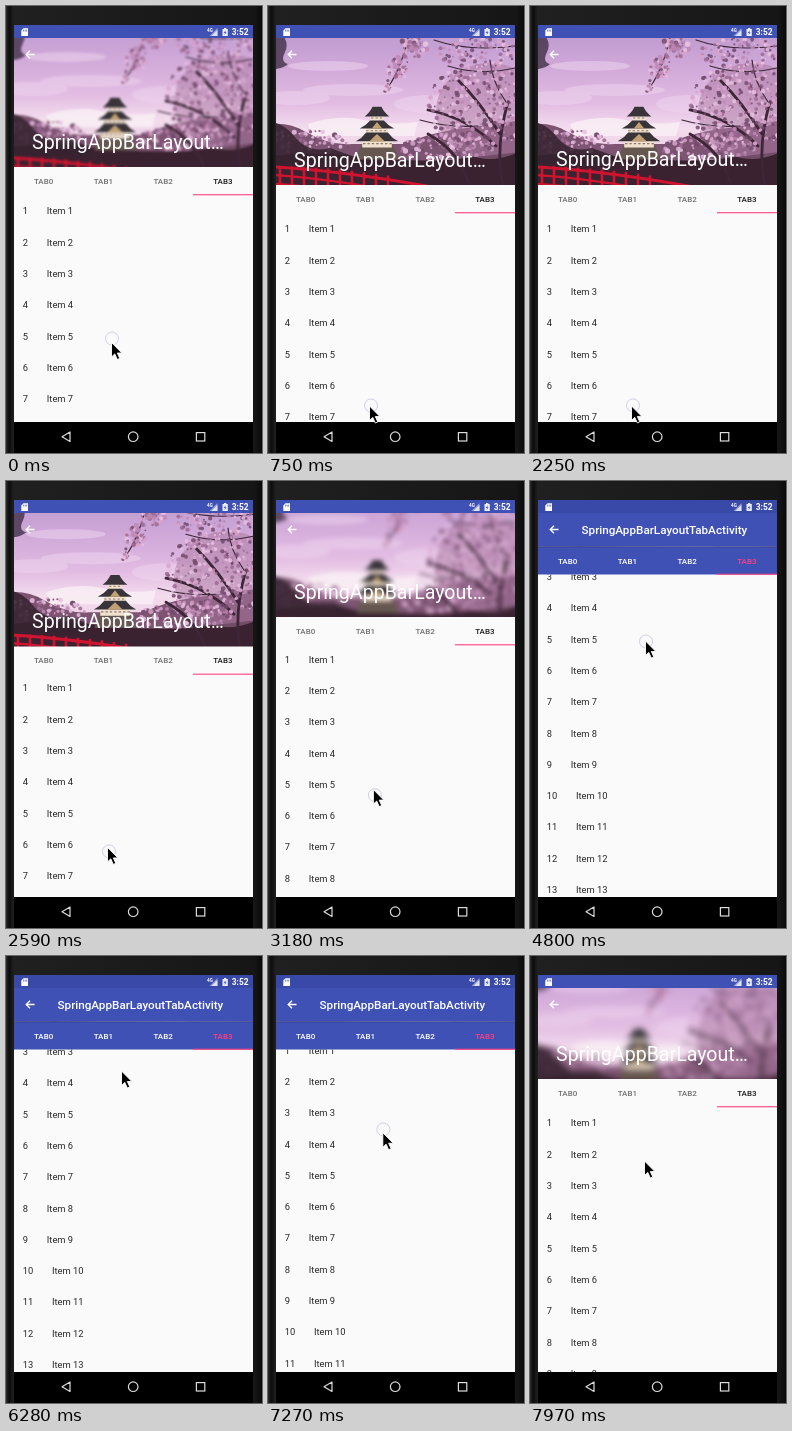
Animation of 256x447 px, one loop 8000 ms. Source, as an HTML page:

```html
<!DOCTYPE html>
<html lang="en">
<head>
<meta charset="utf-8">
<title>Spring app bar</title>
<style>
  html, body { margin: 0; width: 100%; height: 100%; overflow: hidden; background: #161616; }
  svg { display: block; width: 100vw; height: 100vh; }
  text { font-family: Roboto, sans-serif; }
</style>
</head>
<body>
<svg id="stage" viewBox="0 0 256 447">
  <defs>
    <linearGradient id="sky" x1="0" y1="0" x2="0" y2="1">
      <stop offset="0" stop-color="#b794cb"/>
      <stop offset=".25" stop-color="#cfa8d8"/>
      <stop offset=".45" stop-color="#e2bce2"/>
      <stop offset=".58" stop-color="#f3dcee"/>
      <stop offset="1" stop-color="#e0b8d2"/>
    </linearGradient>
    <linearGradient id="bezel">
      <stop offset="0" stop-color="#2c2c2c"/>
      <stop offset=".012" stop-color="#0c0c0c"/>
      <stop offset=".03" stop-color="#202020"/>
      <stop offset=".97" stop-color="#161616"/>
      <stop offset="1" stop-color="#0a0a0a"/>
    </linearGradient>
    <filter id="soft" filterUnits="userSpaceOnUse" x="-12" y="12" width="280" height="190"
            color-interpolation-filters="sRGB">
      <feGaussianBlur id="blur" stdDeviation="0"/>
    </filter>
    <clipPath id="photoClip"><rect id="photoBox" x="8" width="239"/></clipPath>
    <clipPath id="screenClip"><rect x="8" y="19" width="239" height="397"/></clipPath>
  </defs>

  <rect width="256" height="447" fill="url(#bezel)"/>
  <g clip-path="url(#screenClip)">
    <rect x="8" y="19" width="239" height="397" fill="#fafafa"/>
    <g id="list" font-size="9.35" fill="#262626"></g>

    <g id="tabs">
      <rect x="8" width="239" height="28" fill="#fafafa"/>
      <rect class="scrim" x="8" width="239" height="28" fill="#3f51b5"/>
      <path class="scrim" d="M8 .5H247" stroke="#000" stroke-opacity=".18" stroke-width=".8"/>
      <g id="labels" font-size="8" font-weight="500" text-anchor="middle"></g>
      <rect x="187" y="27.2" width="60" height="1.1" fill="#ff4081"/>
    </g>

    <rect x="8" y="19" width="239" height="13" fill="#3f51b5"/>
    <g clip-path="url(#photoClip)"><g id="shift"><g id="photo">
      <rect x="-12" y="12" width="280" height="190" fill="url(#sky)"/>
      <g fill="#f0d6f0" opacity=".5">
        <ellipse cx="60" cy="60" rx="40" ry="5"/>
        <ellipse cx="85" cy="84" rx="50" ry="6"/>
        <ellipse cx="28" cy="92" rx="34" ry="7"/>
        <ellipse cx="160" cy="98" rx="34" ry="9"/>
      </g>
      <path d="M40 118Q70 108 96 114T150 116L146 130H44Z" fill="#fbf0f6" opacity=".8"/>
      <path d="M-12 122Q14 112 38 126T84 138L138 138Q158 128 184 124L268 112V202H-12Z" fill="#7d5472"/>
      <g id="backBloom"></g>
      <path d="M-12 152Q40 144 85 150T180 154L268 144V202H-12Z" fill="#3a2230"/>
      <g transform="translate(23 32) scale(.8)">
        <path d="M82 152L87 135H128L135 152Z" fill="#665850"/>
        <path d="M89 127H126V137H89ZM94 111H121V120H94ZM99 96H116V104H99Z" fill="#f1e2d0"/>
        <path d="M94 116H121M90 132H126M100 100H115" stroke="#8d7768" stroke-width="1.4"
              stroke-dasharray="3 2.5"/>
        <path d="M92 98Q98 94 102 86H113Q117 94 123 98ZM86 113Q94 109 99 103H116Q121 109 129 113ZM81 129Q89 125 94 118H121Q126 125 134 129Z" fill="#38343a"/>
        <path d="M101 113L107.500 105L114 113ZM98 129L107.500 120L117 129Z" fill="#c3a071"/>
      </g>
      <path d="M-12 116Q12 112 26 130T62 142L84 150V158H-12Z" fill="#35242f" opacity=".85"/>
      <path d="M-12 26H12Q22 36 17 46T20 58Q12 66 -12 62Z" fill="#493750" opacity=".85"/>
      <ellipse cx="222" cy="105" rx="54" ry="48" fill="#a9799f" opacity=".5"/>
      <g fill="none" stroke="#3d2638" stroke-linecap="round">
        <path d="M236 184Q226 144 240 96M228 140Q200 112 160 104M232 128Q212 96 190 74M200 176Q192 146 160 128" stroke-width="2.800"/>
        <path d="M247 62Q212 70 180 60M247 40Q200 46 166 34M140 32Q134 60 120 82M238 96Q224 76 222 54M210 120Q180 122 152 114" stroke-width="1.200"/>
      </g>
      <g id="frontBloom"></g>
      <g fill="none" stroke="#d0142f">
        <path d="M-12 160Q70 163 180 184" stroke-width="3"/>
        <path d="M-12 168Q60 171 150 190M-12 177Q50 179 120 194" stroke-width="2.400"/>
        <path id="posts" stroke-width="2.600"/>
      </g>
    </g></g></g>
    <rect id="barScrim" class="scrim" x="8" y="32" width="239" fill="#3f51b5"/>
    <rect class="scrim" x="8" y="19" width="239" height="13" fill="#3949a8"/>

    <path d="M28.500 48.500H20.500M24 44.700L20.200 48.500L24 52.300" fill="none" stroke="#fff" stroke-width="1.300"/>
    <text id="title" fill="#fff"></text>

    <g fill="#fff">
      <path d="M17.500 22.300H22V30H15.300V24.500Z"/>
      <path d="M17.600 23.600V25.600M19.200 23.600V25.600M20.700 23.600V25.600" stroke="#3f51b5" stroke-width=".7"/>
      <text x="201" y="25.500" font-size="4.600" font-weight="700">4G</text>
      <path d="M211.500 22V30H203.500Z" opacity=".45"/>
      <path d="M211.500 24V30H205.500Z" opacity=".7"/>
      <path d="M218 22H220.300V23H221.800V30H216.500V23H218Z" opacity=".9"/>
      <path d="M219.600 24.200L217.700 27H219L218.600 29L220.500 26.200H219.300Z" fill="#3f51b5"/>
      <text x="225.800" y="29" font-size="8.400" font-weight="600">3:52</text>
    </g>
  </g>

  <rect x="8" y="416" width="239" height="31" fill="#000"/>
  <g fill="none" stroke="#dcdcdc" stroke-width="1.200">
    <path d="M64 426V435.500L56 430.700Z" stroke-linejoin="round"/>
    <circle cx="127.200" cy="430.700" r="4.800"/>
    <rect x="190.400" y="426.600" width="8.400" height="8.400"/>
  </g>

  <circle id="ring" r="6.500" fill="none" stroke="#c3c5e2" stroke-width=".8"/>
  <path id="cursor" d="M0 0V14.500L3.300 11.400L5.800 17L8.300 15.900L5.800 10.500H10.400Z"
        fill="#000" stroke="#fff" stroke-width=".9"/>
</svg>
<script>
const LOOP = 8000, REST = 122, MIN = 65.5, OPEN = 179, ROW = 31.3;
const $ = id => document.getElementById(id);
const set = (el, attrs) => { for (const k in attrs) el.setAttribute(k, attrs[k]); return el; };
const add = (parent, tag, attrs, text = '') => {
  const el = set(document.createElementNS('http://www.w3.org/2000/svg', tag), attrs);
  el.textContent = text;
  return parent.appendChild(el);
};
const move = (el, x, y) => el.setAttribute('transform', `translate(${x} ${y})`);
const clamp = v => Math.min(1, Math.max(0, v));
const mix = (a, b, p) => a + (b - a) * p;
const blend = (a, b, p) => `rgb(${a.map((v, i) => Math.round(mix(v, b[i], p)))})`;
const easeOut = p => 1 - (1 - p) * (1 - p);

// Piecewise linear track of [time, ...values]
function track(keys, t) {
  let i = 1;
  while (i < keys.length - 1 && keys[i][0] < t) i++;
  const a = keys[i - 1], b = keys[i], p = clamp((t - a[0]) / (b[0] - a[0]));
  return a.slice(1).map((v, k) => mix(v, b[k + 1], p));
}

const HEIGHT = [[60, 161], [750, 179], [2250, 179], [2590, 165.5], [3463, REST], [3800, 90],
  [4052, MIN], [7415, MIN], [7970, 123]];
const SCROLL = [[2250, 0], [2590, 2.5], [3800, 1], [4052, 1], [4800, 76.5], [6690, 76.5], [7415, 0]];
const CURSOR = [[60, 105.5, 336.5], [750, 101.5, 400], [2250, 101.5, 400], [2590, 101.5, 366.5],
  [3800, 109.5, 248], [4800, 115.5, 160], [4930, 115.5, 160], [4980, 115.5, 162],
  [5100, 115.5, 162], [5630, 119, 80], [5800, 119, 80], [5860, 119, 77], [6050, 119, 77],
  [6280, 115.5, 115], [6640, 115.5, 115], [7560, 114.5, 205]];
const RING = [[60, 106, 332.5], [750, 103, 399.5], [2250, 103, 399.5], [2590, 103, 370.5],
  [3800, 111, 255], [4800, 116, 160.5], [6520, 116, 116], [6690, 116, 116], [7560, 115, 202]];

let seed = 7;
const rnd = () => (seed = seed * 16807 % 2147483647) / 2147483647;
const PINKS = ['#d9a3cc', '#c088b6', '#9c6a93', '#e8bfe0', '#734a6c'];

function bloom(parent, cx, cy, rx, ry, count, size) {
  for (let i = 0; i < count; i++) {
    const a = rnd() * 2 * Math.PI, d = Math.sqrt(rnd());
    add(parent, 'circle', {
      cx: (cx + Math.cos(a) * d * rx).toFixed(1),
      cy: (cy + Math.sin(a) * d * ry).toFixed(1),
      r: (size * (.5 + rnd())).toFixed(1),
      fill: PINKS[Math.floor(rnd() * PINKS.length)],
      opacity: .85
    });
  }
}

bloom($('backBloom'), 36, 137, 44, 13, 80, 1.7);
bloom($('backBloom'), 180, 142, 48, 14, 110, 1.8);
bloom($('frontBloom'), 212, 100, 52, 44, 330, 1.6);
bloom($('frontBloom'), 212, 46, 42, 16, 110, 1.6);
bloom($('frontBloom'), 145, 42, 14, 11, 50, 1.8);
bloom($('frontBloom'), 130, 62, 11, 11, 40, 1.7);
bloom($('frontBloom'), 119, 80, 5, 6, 14, 1.5);

let posts = '';
for (let x = 0; x < 130; x += 12) posts += `M${x} ${160 + x * x / 1500}v28`;
$('posts').setAttribute('d', posts);

for (let n = 1; n <= 15; n++) {
  const y = 47.4 + ROW * (n - 1);
  add($('list'), 'text', { x: 16.8, y }, n);
  add($('list'), 'text', { x: n < 10 ? 40.8 : 46, y }, 'Item ' + n);
}
const labels = [0, 1, 2, 3].map(i => add($('labels'), 'text', { x: 37.6 + i * 59.75, y: 17 }, 'TAB' + i));
const scrims = document.querySelectorAll('.scrim');

function drawTitle(h) {
  const p = clamp((REST - h) / (REST - MIN)), closed = p > .985;
  const title = $('title');
  title.textContent = closed ? 'SpringAppBarLayoutTabActivity' : 'SpringAppBarLayout…';
  set(title, {
    x: mix(26, 51.5, p),
    y: mix(Math.max(h, REST) - 18.5, 52.8, p),
    'font-size': mix(19.6, 11.7, easeOut(p)),
    'font-weight': closed ? 500 : 400
  });
}

function drawPhoto(h) {
  const under = Math.max(0, REST - h);
  const top = Math.max(19, 32 - under);
  const centre = (32 + Math.max(h, REST)) / 2 - under;
  const blur = 3 * clamp((OPEN - h) / (OPEN - REST));
  set($('photoBox'), { y: top, height: Math.max(0, h - top) });
  move($('shift'), 0, centre - 105.5);
  $('blur').setAttribute('stdDeviation', blur.toFixed(2));
  $('photo').setAttribute('filter', blur > .05 ? 'url(#soft)' : 'none');
}

function draw(t) {
  const [h] = track(HEIGHT, t), [scroll] = track(SCROLL, t);
  const fade = t < 6000 ? easeOut(clamp((t - 4050) / 600)) : 1 - easeOut(clamp((t - 7415) / 500));

  move($('list'), 0, h - scroll);
  move($('tabs'), 0, h);
  set($('barScrim'), { height: h - 32 });
  scrims.forEach(el => el.setAttribute('opacity', fade));
  labels.forEach((el, i) => el.setAttribute('fill', i < 3
    ? blend([112, 112, 112], [255, 255, 255], fade)
    : blend([25, 25, 25], [255, 64, 129], fade)));
  drawPhoto(h);
  drawTitle(h);

  const [rx, ry] = track(RING, t), pressed = t < 5150 || (t >= 6520 && t < 7560);
  set($('ring'), { cx: rx, cy: ry, visibility: pressed ? 'visible' : 'hidden' });
  move($('cursor'), ...track(CURSOR, t));
}

const start = performance.now();
function tick() {
  draw((performance.now() - start) % LOOP);
  requestAnimationFrame(tick);
}
tick();
</script>
</body>
</html>
```
